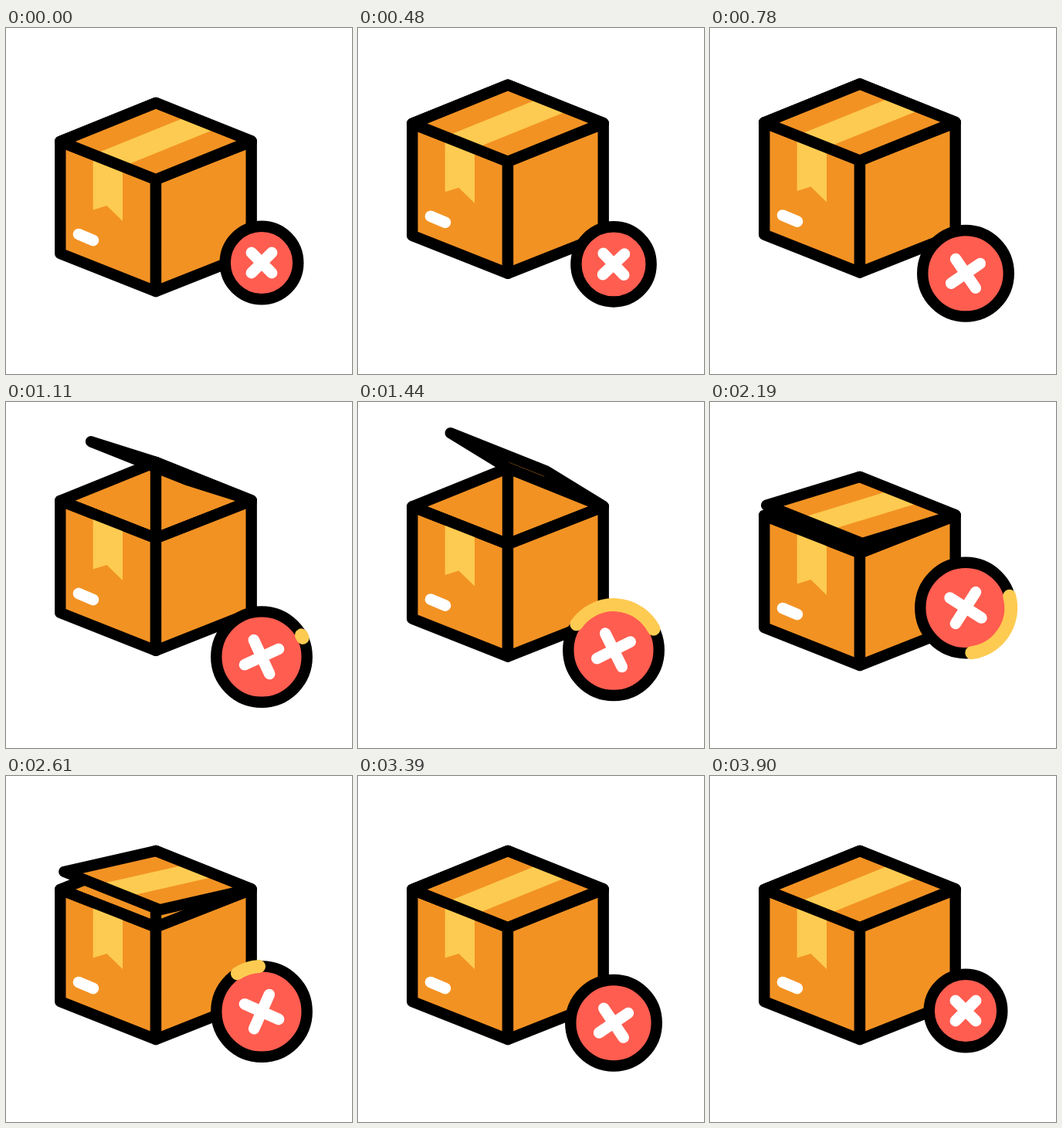
Recreate the animation shown at these times as an HTML page. Size 448 px wide and 448 px high, loop 4500 ms.

```html
<!DOCTYPE html>
<html lang="en">
<head>
<meta charset="utf-8">
<title>Cancelled parcel</title>
<style>
html, body { margin: 0; height: 100%; overflow: hidden; background: #fff; }
svg { display: block; width: 100%; height: 100%; }
.line { stroke: #000; stroke-width: 14.4; stroke-linejoin: round; stroke-linecap: round; }
.face { fill: #f29223; }
.tape { fill: #fdcb51; }
.white { fill: none; stroke: #fff; stroke-width: 14.6; stroke-linecap: round; }
</style>
</head>
<body>
<svg viewBox="0 0 448 448">
  <g id="box">
    <path class="line face" d="M70.3 147 194 97 317.7 147 194 195.5Z"/>
    <path class="line" d="M194 97V195"/>
    <path class="line face" d="M70.3 147 194 195.5V341L70.3 292Z"/>
    <path class="line face" d="M317.7 147 194 195.5V341L317.7 292Z"/>
    <path class="tape" d="M112.7 163.6 151 178.6V250L130.5 230 112.7 235.5Z"/>
    <path class="line" fill="none" d="M70.3 147 194 195.5 317.7 147"/>
    <path class="white" d="M94 267 113 275"/>
    <path class="face" id="lid"/>
    <path class="tape" id="strip"/>
    <path class="line" fill="none" id="rim"/>
  </g>
  <g id="badge">
    <circle class="line" id="disc" fill="#ff5d50"/>
    <path id="arc" fill="none" stroke="#fdcb51" stroke-width="17" stroke-linecap="round"/>
    <path class="white" id="cross"/>
  </g>
</svg>
<script>
const LOOP = 4500, STEP = 30;
const set = (id, name, value) => document.getElementById(id).setAttribute(name, value);

const progress = (t, from, to) => Math.min(1, Math.max(0, (t - from) / (to - from)));
const ramp = (t, from, to) => (1 - Math.cos(Math.PI * progress(t, from, to))) / 2;
const pulse = (t, from, peak, to) => ramp(t, from, peak) - ramp(t, peak, to);

function drawLid(t) {
  const open = pulse(t, 780, 1290, 2022), rebound = pulse(t, 2022, 2400, 2993);
  const hx = 123.7, hy = 49.3;
  const vx = -hx + 55 * open + 7 * rebound;
  const vy = 50 - 106 * open - 32 * rebound;

  // s runs along the hinge, q from the hinge to the free edge.
  const point = (s, q) => `${194 + hx * s + vx * q} ${97 + hy * s + vy * q}`;
  const quad = (a, b) => `M${point(a, 0)}L${point(b, 0)}L${point(b, 1)}L${point(a, 1)}Z`;
  set('lid', 'd', quad(0, 1));
  set('rim', 'd', quad(0, 1));
  const faceUp = hx * vy - hy * vx > 0;
  set('strip', 'd', faceUp ? quad(0.343, 0.655) : '');
}

// Both ends of the arc run the same way round; the tail starts later.
function drawArc(t, r) {
  const p = progress(t, 1100, 2750);
  const head = -65 + 490 * (p + 0.24 * p * (1 - p));
  const tail = -65 + 490 * ramp(t, 1364, 2984);
  if (head - tail < 0.5) return set('arc', 'd', '');
  const spot = deg => {
    const a = deg * Math.PI / 180;
    return `${-r * Math.sin(a)} ${-r * Math.cos(a)}`;
  };
  const large = head - tail > 180 ? 1 : 0;
  set('arc', 'd', `M${spot(tail)}A${r} ${r} 0 ${large} 0 ${spot(head)}`);
}

function drawBadge(t) {
  // Down, up, down and back in four equal beats.
  const beat = (3880 - 330) / 4;
  const sway = [27, -66, 66, -27].reduce((y, d, i) =>
    y + d * ramp(t, 330 + i * beat, 330 + (i + 1) * beat), 0);
  set('badge', 'transform', `translate(331 ${304 + sway})`);

  const grow = pulse(t, 330, 1010, 3127) + ramp(t, 1010, 3127) - ramp(t, 3127, 3900);
  const r = 47.3 + 11.4 * grow;
  set('disc', 'r', r);
  drawArc(t, r);

  const h = (18.6 + 5.6 * grow) * Math.SQRT1_2;
  const turn = 21 * ramp(t, 330, 1222) - 42 * ramp(t, 1222, 2600)
    + 39 * ramp(t, 2600, 3007) - 18 * ramp(t, 3007, 3900);
  set('cross', 'd', `M${-h} ${-h}L${h} ${h}M${h} ${-h}L${-h} ${h}`);
  set('cross', 'transform', `rotate(${turn})`);
}

function draw(t) {
  set('box', 'transform', `translate(0 ${-26 * pulse(t, 330, 520, 2232)})`);
  drawLid(t);
  drawBadge(t);
}

const start = performance.now();
function tick() {
  const t = (performance.now() - start) % LOOP;
  draw(Math.floor(t / STEP) * STEP);
  requestAnimationFrame(tick);
}
tick();
</script>
</body>
</html>
```
